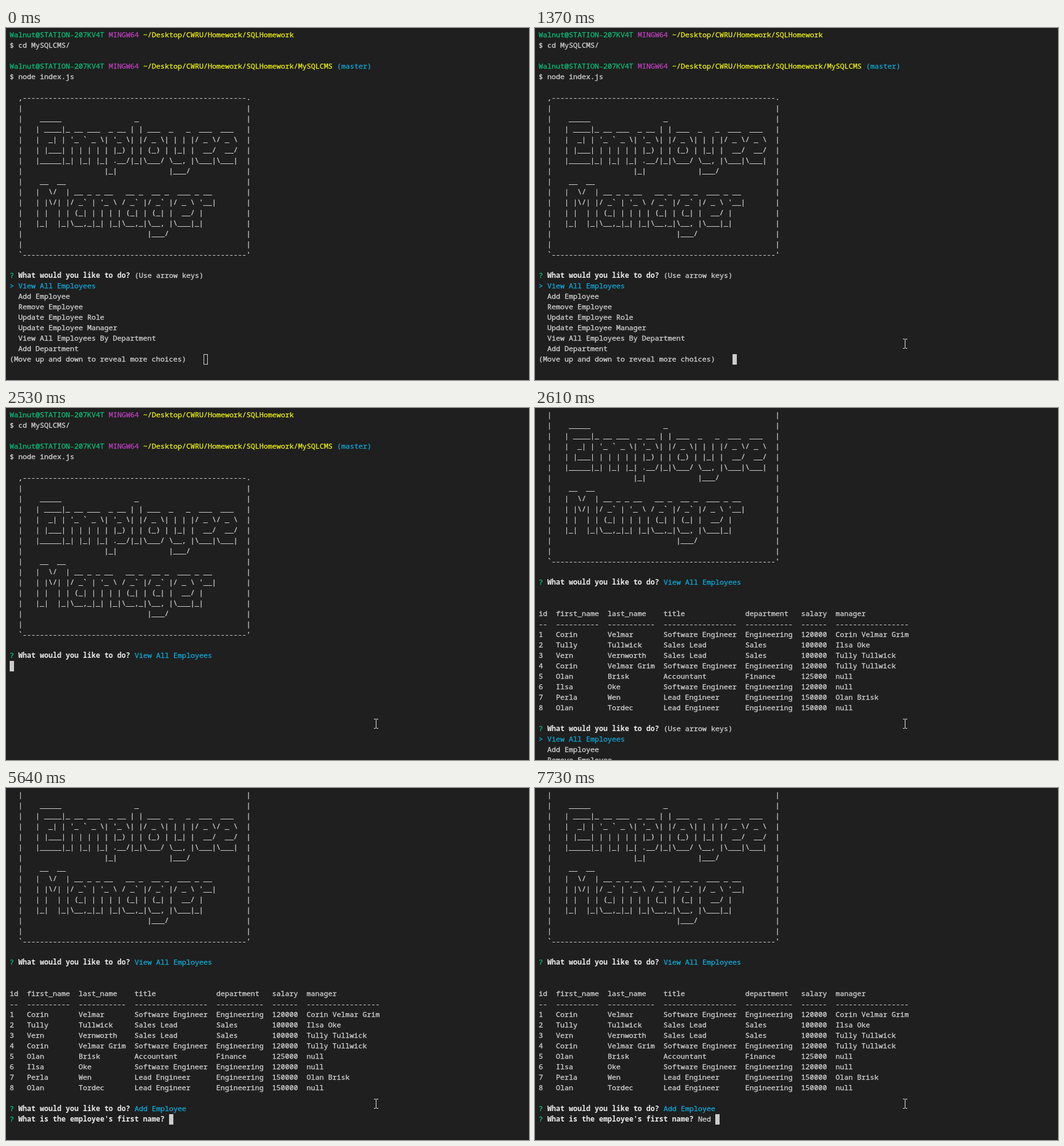
Animation of 850x572 px, one loop 8 s. Source, as an HTML page with a canvas:

```html
<!DOCTYPE html>
<html lang="en">
<head>
<meta charset="utf-8">
<title>Employee Manager terminal</title>
<style>
  html, body { margin: 0; width: 100%; height: 100%; overflow: hidden; background: #1e1f1e; }
  canvas { display: block; }
</style>
</head>
<body>
<canvas id="screen" width="850" height="572"></canvas>
<script type="text/plain" id="banner">

  _____                 _
 | ____|_ __ ___  _ __ | | ___  _   _  ___  ___
 |  _| | '_ ` _ \| '_ \| |/ _ \| | | |/ _ \/ _ \
 | |___| | | | | | |_) | | (_) | |_| |  __/  __/
 |_____|_| |_| |_| .__/|_|\___/ \__, |\___|\___|
                 |_|            |___/
  __  __
 |  \/  | __ _ _ __   __ _  __ _  ___ _ __
 | |\/| |/ _` | '_ \ / _` |/ _` |/ _ \ '__|
 | |  | | (_| | | | | (_| | (_| |  __/ |
 |_|  |_|\__,_|_| |_|\__,_|\__, |\___|_|
                           |___/

</script>
<script>
// An opaque canvas lets the browser use its crispest text rendering.
const ctx = document.getElementById('screen').getContext('2d', { alpha: false });
const LOOP = 8000, LEFT = 6, TOP = 3, CELL = 7, ROW = 17, BASELINE = 12;
const FONT = '11.667px "Noto Sans Mono", "DejaVu Sans Mono", monospace';
const BACK = '#1e1f1e', TEXT = '#d2d2d2', BOLD = '#ececec', BLOCK = '#cccccc';
const GREEN = '#0dbc79', MAGENTA = '#bc3fbc', YELLOW = '#eeee18', CYAN = '#11a8d8';

// A line is a list of [text, color] segments.
const plain = text => [[text, TEXT]];
const shellPrompt = (path, branch = '') => [
  ['Walnut@STATION-207KV4T ', GREEN], ['MINGW64 ', MAGENTA], [path, YELLOW], [branch, CYAN]];
const question = (text, answer = '', color = CYAN) => [
  ['? ', GREEN], [text + ' ', BOLD], [answer, color]];

const bannerRows = document.getElementById('banner').textContent.split('\n').slice(1, -1);
const rule = '-'.repeat(52);
const intro = [
  shellPrompt('~/Desktop/CWRU/Homework/SQLHomework'),
  plain('$ cd MySQLCMS/'),
  [],
  shellPrompt('~/Desktop/CWRU/Homework/SQLHomework/MySQLCMS', ' (master)'),
  plain('$ node index.js'),
  [],
  plain(`  ,${rule}.`),
  ...bannerRows.map(row => plain('  |' + ('  ' + row).padEnd(52) + '|')),
  plain('  `' + rule + "'"),
  [],
];

const WIDTHS = [2, 10, 11, 17, 11, 6, 17];
const table = [
  'id,first_name,last_name,title,department,salary,manager',
  WIDTHS.map(width => '-'.repeat(width)).join(),
  '1,Corin,Velmar,Software Engineer,Engineering,120000,Corin Velmar Grim',
  '2,Tully,Tullwick,Sales Lead,Sales,100000,Ilsa Oke',
  '3,Vern,Vernworth,Sales Lead,Sales,100000,Tully Tullwick',
  '4,Corin,Velmar Grim,Software Engineer,Engineering,120000,Tully Tullwick',
  '5,Olan,Brisk,Accountant,Finance,125000,null',
  '6,Ilsa,Oke,Software Engineer,Engineering,120000,null',
  '7,Perla,Wen,Lead Engineer,Engineering,150000,Olan Brisk',
  '8,Olan,Tordec,Lead Engineer,Engineering,150000,null',
].map(row => plain(row.split(',').map((cell, i) => cell.padEnd(WIDTHS[i] + 2)).join('')));

const CHOICES = ['View All Employees', 'Add Employee', 'Remove Employee', 'Update Employee Role',
  'Update Employee Manager', 'View All Employees By Department', 'Add Department', 'Quit'];
const ASK = 'What would you like to do?';
const MORE = '(Move up and down to reveal more choices)';

// Seven visible choices; `first` is the index of the topmost one.
function menu(pointer, first = 0, hint = '') {
  const items = Array.from({ length: 7 }, (_, i) => {
    const name = CHOICES[(first + i + CHOICES.length) % CHOICES.length];
    return i === pointer ? [['> ' + name, CYAN]] : plain('  ' + name);
  });
  return [question(ASK, hint, TEXT), ...items, plain(MORE)];
}

const HINT = '(Use arrow keys)';
const KEYS = [[7340, 'N'], [7500, 'e'], [7570, 'd'], [7730, ' ']];
const typedAt = t => KEYS.filter(([at]) => t >= at).map(([, key]) => key).join('');

// Terminal contents, scroll offset in rows, and text cursor cell on screen.
function terminalAt(t) {
  if (t < 2150) return { lines: [...intro, ...menu(0, 0, HINT)], scroll: 0, cursor: [45, 31] };
  if (t < 2370) return { lines: [...intro, ...menu(1)], scroll: 0, cursor: [29, 31] };
  if (t < 2530) return { lines: [...intro, ...menu(1, -1)], scroll: 0, cursor: [29, 31] };

  const viewed = [...intro, question(ASK, 'View All Employees')];
  if (t < 2610) return { lines: viewed, scroll: 0, cursor: [0, 24] };

  const listed = [...viewed, [], [], ...table, []];
  if (t < 3850) return { lines: [...listed, ...menu(0, 0, HINT)], scroll: 7 };
  if (t < 5640) return { lines: [...listed, ...menu(1)], scroll: 7 };

  const typed = typedAt(t);
  return {
    lines: [...listed, question(ASK, 'Add Employee'),
      question("What is the employee's first name?", typed, TEXT)],
    scroll: 7,
    cursor: [37 + typed.length, 31],
  };
}

function drawLine(line, row, color) {
  const y = TOP + row * ROW + BASELINE;
  let column = 0;
  for (const [text, ink] of line) {
    const x = LEFT + column * CELL;
    ctx.font = (ink === BOLD ? 'bold ' : '') + FONT;
    ctx.fillStyle = ctx.strokeStyle = color || ink;
    ctx.fillText(text, x, y);
    // A hairline outline thickens the regular weight a little.
    if (ink !== BOLD) {
      ctx.lineWidth = 0.3;
      ctx.strokeText(text, x, y);
    }
    column += text.length;
  }
}

function drawCursor([column, row], focused, line) {
  const x = LEFT + column * CELL, y = TOP + row * ROW;
  if (!focused) {
    ctx.strokeStyle = BLOCK;
    ctx.lineWidth = 1;
    ctx.strokeRect(x + 0.5, y + 0.5, CELL - 1, ROW - 1);
    return;
  }
  ctx.save();
  ctx.beginPath();
  ctx.rect(x, y, CELL, ROW);
  ctx.clip();
  ctx.fillStyle = BLOCK;
  ctx.fillRect(x, y, CELL, ROW);
  drawLine(line, row, BACK);
  ctx.restore();
}

// Mouse positions: time, x, y.
const MOUSE = [[500, 713, 566], [580, 667, 540], [660, 630, 519], [730, 608, 506],
  [810, 602, 507], [970, 609, 507], [1210, 605, 510], [1290, 601, 513]];

function drawMouse(t) {
  const step = MOUSE.findLast(([at]) => t >= at);
  if (!step) return;
  const [, x, y] = step;
  ctx.fillStyle = '#e0e0e0';
  for (const edge of [y - 8, y + 7]) {
    ctx.fillRect(x - 3, edge, 3, 1);
    ctx.fillRect(x + 1, edge, 3, 1);
  }
  ctx.fillRect(x, y - 7, 1, 14);
}

function draw() {
  const t = performance.now() % LOOP;
  const { lines, scroll, cursor } = terminalAt(t);
  ctx.fillStyle = BACK;
  ctx.fillRect(0, 0, 850, 572);
  lines.slice(scroll).forEach((line, row) => drawLine(line, row));
  if (cursor) drawCursor(cursor, t >= 1370, lines[cursor[1] + scroll] || []);
  drawMouse(t);
  requestAnimationFrame(draw);
}
draw();
</script>
</body>
</html>
```
